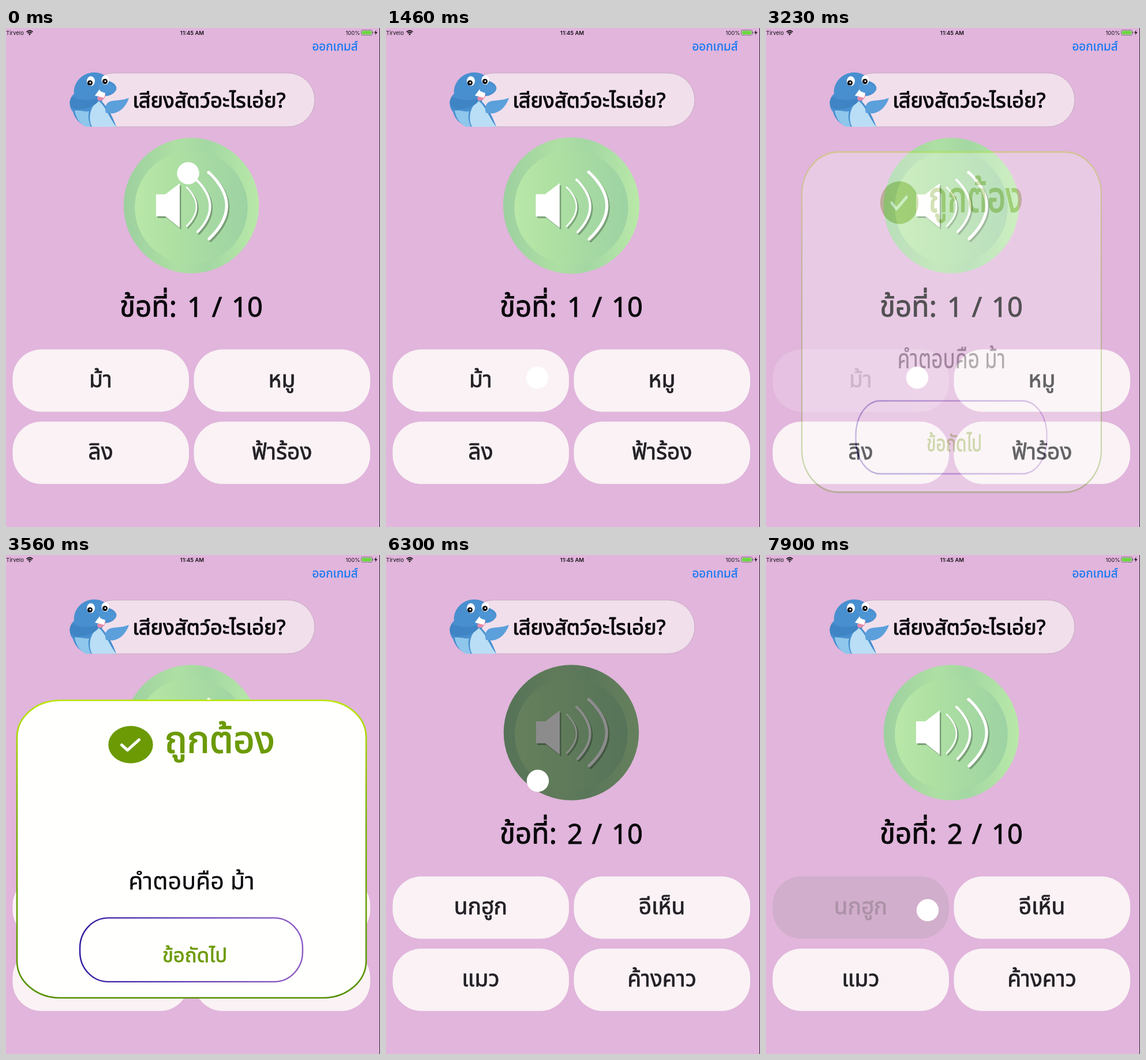
Animation of 648x864 px, one loop 8000 ms. Source, as an HTML page:

```html
<!DOCTYPE html>
<html lang="th">
<head>
<meta charset="utf-8">
<title>Quiz</title>
<style>
  html, body { margin: 0; width: 100%; height: 100%; overflow: hidden; background: #e1b5dc; }
  svg { display: block; width: 100vw; height: 100vh; }
  text { font-family: 'Noto Sans Thai Looped', 'Noto Sans Thai', 'Noto Sans', sans-serif; }
  .status text { font-family: Inter, 'Liberation Sans', sans-serif; font-size: 9.5px; fill: #151015; }
  .mid { text-anchor: middle; }
  .ink { fill: #0a080c; stroke: #0a080c; }
  .olive { fill: #6c9a05; stroke: #6c9a05; }
  .choice text { font-size: 39px; text-anchor: middle; fill: #222126; stroke: #222126; stroke-width: .8; }
  .choice rect { fill: #faf2f5; }
  .choice.pressed rect { fill: #d1aecb; }
  .choice.pressed text { fill: #ac92a8; stroke: #ac92a8; }
  .arcs { fill: none; stroke-linecap: round; }
</style>
</head>
<body>
<svg viewBox="0 0 648 864">
  <defs>
    <linearGradient id="rim">
      <stop offset="0" stop-color="#9cd09f"/><stop offset=".4" stop-color="#aedfa3"/>
      <stop offset=".62" stop-color="#a3d7a3"/><stop offset="1" stop-color="#b9e9a8"/>
    </linearGradient>
    <linearGradient id="face">
      <stop offset="0" stop-color="#b9e8a9"/><stop offset=".35" stop-color="#aee0a2"/>
      <stop offset="1" stop-color="#9dd2a3"/>
    </linearGradient>
    <linearGradient id="frame" x2="0" y2="1">
      <stop offset="0" stop-color="#b9e600"/><stop offset=".4" stop-color="#79ae08"/>
      <stop offset="1" stop-color="#569000"/>
    </linearGradient>
    <linearGradient id="violet">
      <stop offset="0" stop-color="#3218a0"/><stop offset="1" stop-color="#8d5ac4"/>
    </linearGradient>
    <linearGradient id="violetDark">
      <stop offset="0" stop-color="#20156b"/><stop offset="1" stop-color="#643f85"/>
    </linearGradient>
    <g id="horn">
      <path d="M260 288H276L301 269V346L276 326H260Z" stroke="none"/>
      <g class="arcs">
        <path d="M313 276Q347 309 313 343" stroke-width="2.6"/>
        <path d="M330 263Q376 308 332 353" stroke-width="4"/>
        <path d="M351 250Q413 307 352 365" stroke-width="5.2"/>
      </g>
    </g>
  </defs>

  <rect width="648" height="864" fill="#e1b5dc"/>

  <g class="status">
    <text x="0" y="11.5">Tirvelo</text>
    <g fill="none" stroke="#151015" stroke-width="1.7">
      <path d="M35.5 6.8Q41 2.2 46.5 6.8M37.5 9Q41 6 44.5 9"/>
      <circle cx="41" cy="11" r=".6"/>
    </g>
    <text x="322.5" y="11.5" class="mid" font-weight="600">11:45 AM</text>
    <text x="588.5" y="11.5">100%</text>
    <rect x="615.5" y="3.5" width="19" height="9" rx="2" fill="none" stroke="#777"/>
    <rect x="617" y="5" width="16" height="6" rx="1" fill="#69d83f"/>
    <path d="M635.7 6.5v3" stroke="#777" stroke-width="1.5"/>
    <path d="M641.5 3.5L638 8.5H640.5L639.5 12.5L643.5 7H640.8Z" fill="#151015"/>
  </g>
  <text x="570" y="39" class="mid" font-size="20.7" fill="#1479f3" stroke="#1479f3" stroke-width=".3">ออกเกมส์</text>

  <g id="content">
    <rect x="140" y="78" width="395" height="93" rx="46.5" fill="#f1dfec" stroke="#c5a9c0"/>
    <g id="dolphin">
      <path fill="#488fcf" d="M150 77C164 76 174 82 179 92C188 95 193 101 191 107C187 115 178 118 170 118L166 127C178 140 186 156 191 171H142C129 168 119 157 116 145C109 138 108 122 118 114C116 96 130 79 150 77Z"/>
      <path fill="#b9def5" d="M160 126C172 134 179 156 191 171H149C142 157 145 136 160 126Z"/>
      <path fill="#8fc6ec" d="M119 143C129 142 138 146 144 144C141 154 144 164 147 171H138C127 165 121 155 119 143Z"/>
      <path fill="#5b9fdb" d="M173 147C170 135 174 127 186 126C197 125 205 124 213 121C208 137 196 147 184 148Z"/>
      <path fill="#3f84c4" d="M114 119C128 126 150 127 162 119C164 130 145 140 130 140C118 144 108 136 111 125Z"/>
      <path fill="#e98aa8" d="M158 120L172 114C174 122 165 128 159 125Z"/>
      <path fill="#fff" d="M154 117L163 105L172 113L170 121Z"/>
      <path fill="#4d95d4" d="M160 98C174 94 190 97 191 106C187 115 173 115 163 109Z"/>
      <g fill="#fff"><ellipse cx="147" cy="92" rx="7" ry="8.5"/><ellipse cx="172" cy="90" rx="6.5" ry="8"/></g>
      <circle cx="145.5" cy="95" r="4.5"/><circle cx="171.5" cy="92.5" r="4.5"/>
      <g fill="#fff"><circle cx="146" cy="94.5" r="1.5"/><circle cx="172" cy="92" r="1.5"/></g>
    </g>
    <text x="352" y="138" class="mid ink" font-size="36.5" stroke-width="1.1">เสียงสัตว์อะไรเอ่ย?</text>

    <g id="speaker">
      <circle cx="321" cy="307.5" r="117.2" fill="url(#rim)"/>
      <circle cx="321" cy="310.5" r="97.8" fill="url(#face)"/>
      <use href="#horn" x="2.5" y="3" fill="#7a9f78" stroke="#7a9f78"/>
      <use href="#horn" fill="#fff" stroke="#fff"/>
      <circle id="shade" cx="321" cy="307.5" r="117.2" opacity=".45"/>
    </g>

    <g class="ink" font-size="47" stroke-width=".9">
      <text x="197" y="500" font-size="49.5">ข้อที่:</text>
      <text id="number" x="327.5" y="500" class="mid">1</text>
      <text x="365.5" y="500" class="mid">/</text>
      <text x="418" y="500" class="mid">10</text>
    </g>
    <g id="choices"></g>
  </g>

  <g id="modal">
    <rect x="20.5" y="250.5" width="602" height="517.5" rx="74" ry="64" fill="#fffffd" stroke="url(#frame)" stroke-width="2.6"/>
    <ellipse cx="216.5" cy="327.5" rx="38.5" ry="32.5" fill="#6c9a05"/>
    <path d="M201 328L211 337L231 319" fill="none" stroke="#fff" stroke-width="5" stroke-linecap="round" stroke-linejoin="round"/>
    <text x="370" y="341" class="mid olive" font-size="64.5" stroke-width="1.6">ถูกต้อง</text>
    <text x="321.5" y="579" class="mid ink" font-size="41" stroke-width=".3">คำตอบคือ ม้า</text>
    <rect id="nextFrame" x="129" y="629" width="384" height="111" rx="49" ry="52" fill="none" stroke-width="2.4"/>
    <text id="nextLabel" x="327" y="706" class="mid" font-size="34.5" stroke-width=".8">ข้อถัดไป</text>
  </g>

  <circle id="touch" r="19.2" fill="#fff"/>
  <rect x="647" width="1" height="864" fill="#2b2029"/>
</svg>

<script>
const LOOP = 8000;
const questions = [
  ['ม้า', 'หมู', 'ลิง', 'ฟ้าร้อง'],
  ['นกฮูก', 'อีเห็น', 'แมว', 'ค้างคาว'],
];
const el = id => document.getElementById(id);
const clamp = v => Math.max(0, Math.min(1, v));
const within = (t, a, b) => t >= a && t < b;
const scaleAt = (x, y, sx, sy) => `translate(${x} ${y}) scale(${sx} ${sy}) translate(${-x} ${-y})`;

function svg(tag, attrs, parent) {
  const node = document.createElementNS('http://www.w3.org/2000/svg', tag);
  for (const key in attrs) node.setAttribute(key, attrs[key]);
  return parent.appendChild(node);
}

const choices = questions[0].map((_, i) => {
  const x = 11.5 + (i % 2) * 314, y = 556.5 + (i >> 1) * 125;
  const group = svg('g', { class: 'choice' }, el('choices'));
  svg('rect', { x, y, width: 305.5, height: 108, rx: 50 }, group);
  return { group, label: svg('text', { x: x + 152.5, y: y + 65.5 }, group) };
});

// Damped spring: distance left to rest, starting at 1.
function spring(s, decay, omega) {
  return Math.exp(-decay * s) * (Math.cos(omega * s) + decay / omega * Math.sin(omega * s));
}

// The speaker shrinks on release, then wobbles back to full size.
function pulse(t, release, end) {
  const s = (t - release) / 1000 - 0.07;
  return s < 0 || t >= end ? 1 : 1 - 0.23 * spring(s, 0.86, 9);
}

function touchPoint(t) {
  if (t < 1400) return [315.5, 251.5];
  if (t < 3500) return [262, 605.5];
  if (t < 6300) return null;
  if (t < 7640) return [263, 391];
  return [280, 615];
}

function render(t) {
  const second = t >= 5400;
  const question = questions[+second];
  choices.forEach((choice, i) => {
    choice.label.textContent = question[i];
    const pressed = i === 0 && (within(t, 3000, 3200) || t >= 7900);
    const released = i === 0 && within(t, 3200, 3500);
    choice.group.setAttribute('class', pressed ? 'choice pressed' : 'choice');
    choice.group.setAttribute('opacity', released ? 0.2 + 0.8 * clamp((t - 3230) / 250) : 1);
  });
  el('number').textContent = second ? 2 : 1;
  el('content').setAttribute('opacity', second ? clamp(0.25 + (t - 5400) / 600) : 1);

  const size = t < 5000 ? pulse(t, 500, 2940) : pulse(t, 6400, 7640);
  el('speaker').setAttribute('transform', scaleAt(321, 307.5, size, size));
  const held = within(t, 300, 500) || within(t, 6300, 6400);
  el('shade').style.display = held ? '' : 'none';

  const open = within(t, 3200, 5400);
  el('modal').style.display = open ? '' : 'none';
  if (open) {
    const s = (t - 3200) / 1000;
    const jelly = s < 0.72 ? 0.152 * spring(s, 6, 13.5) : 0;
    el('modal').setAttribute('transform', scaleAt(321.5, 509, 1 - jelly, 1 + jelly));
    el('modal').setAttribute('opacity', Math.min(clamp((s + 0.01) / 0.14), clamp((5420 - t) / 220)));
    const pressed = within(t, 5000, 5200);
    const color = pressed ? '#3e5709' : '#6c9a05';
    el('nextFrame').setAttribute('stroke', `url(#${pressed ? 'violetDark' : 'violet'})`);
    el('nextLabel').setAttribute('fill', color);
    el('nextLabel').setAttribute('stroke', color);
  }

  const point = touchPoint(t);
  el('touch').style.display = point ? '' : 'none';
  if (point) el('touch').setAttribute('transform', `translate(${point})`);
}

const start = performance.now();
function tick() {
  render((performance.now() - start) % LOOP);
  requestAnimationFrame(tick);
}
tick();
</script>
</body>
</html>
```
